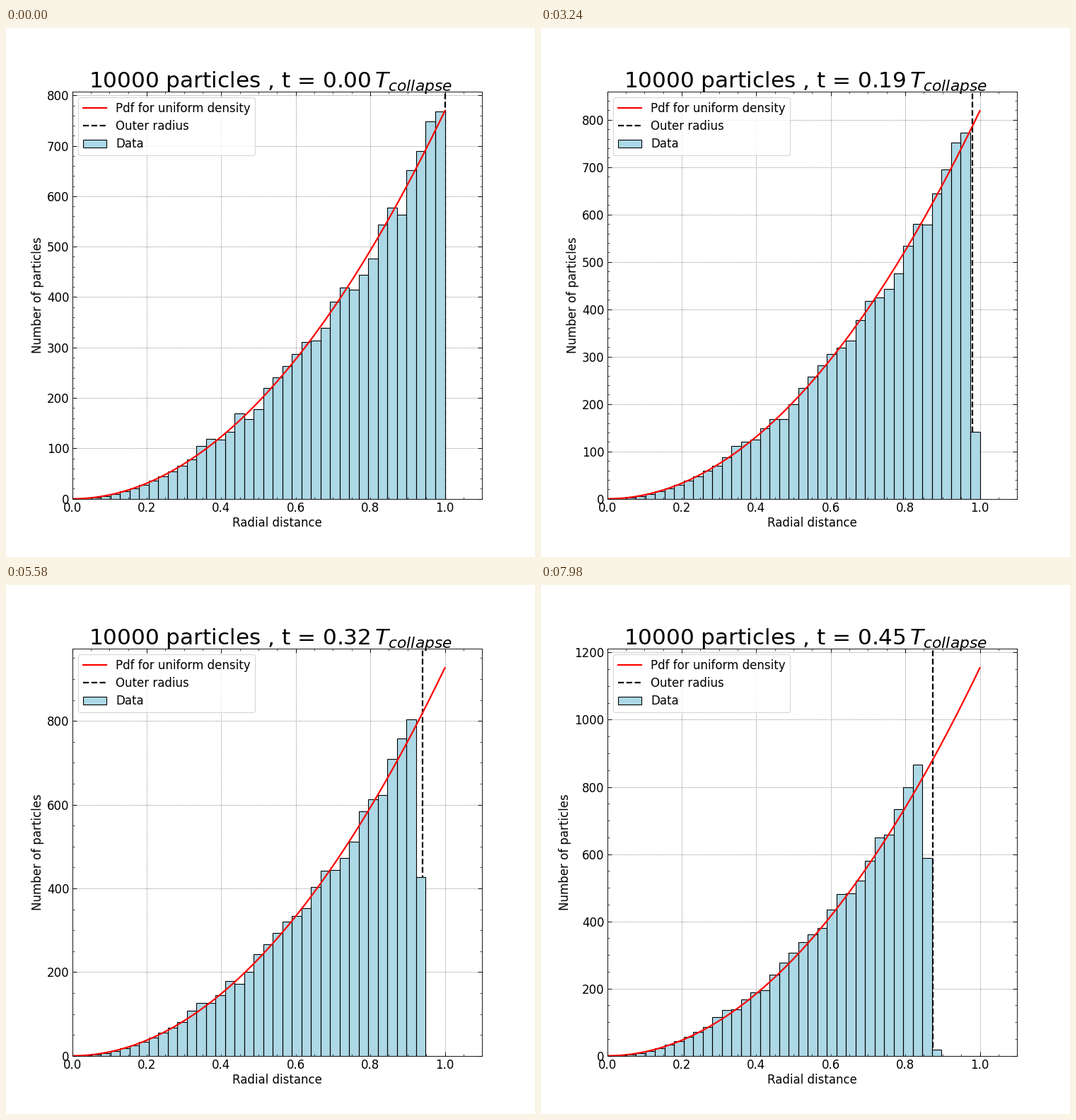
These frames come from a looping animation (748x748 px, 8000 ms). A matplotlib script:

```python
import numpy as np
import matplotlib.pyplot as plt
from matplotlib.animation import FuncAnimation
from matplotlib.lines import Line2D, TICKDOWN, TICKLEFT, TICKRIGHT, TICKUP
from matplotlib.patches import PathPatch
from matplotlib.path import Path
from matplotlib.ticker import MultipleLocator

plt.rcParams.update({"font.family": "DejaVu Sans", "font.size": 15})

PARTICLES = 10000
BINS = 39
TICK_MS = 20
TICKS = 400
LAST_STEP = 171
TIME_STEP = 0.002655  # collapse times per simulation step

edges = np.linspace(0, 1, BINS + 1)
radius = np.linspace(0, 1, 1000)

# Sampling noise: bin edge, surplus of enclosed particles over a uniform ball.
NOISE = [(0, 0), (13, -12), (15, 14), (17, 5), (18, 19), (20, -12), (25, 26),
         (27, -6), (29, 11), (32, -66), (34, -46), (35, -86), (37, -55),
         (38, -18), (39, 0)]
noise_edge, noise_count = zip(*NOISE)
enclosed = (PARTICLES * radius**3
            + np.interp(radius * BINS, noise_edge, noise_count))


def outer_radius(n):
    return 1 - 4.18e-6 * n**2 - 5e-12 * n**4


def bin_counts(n):
    """Shells shrink together, the bulk a little faster than the rim."""
    lead = 0.0115 * (n / LAST_STEP)**3
    shell = outer_radius(n) * radius * (1 - lead * (1 - radius**240))
    return np.diff(np.interp(edges, shell, enclosed))


def bars_path(counts):
    left, right = edges[:-1], edges[1:]
    zero = np.zeros(BINS)
    x = np.stack([left, left, right, right, left], axis=1)
    y = np.stack([zero, counts, counts, zero, zero], axis=1)
    codes = [Path.MOVETO] + [Path.LINETO] * 3 + [Path.CLOSEPOLY]
    return Path(np.column_stack([x.ravel(), y.ravel()]), codes * BINS)


def step_at(tick):
    """Steps last 20, 20 and 100 ms in turn."""
    if tick < 6:
        return min(tick, 1)
    cycle, rest = divmod(tick - 6, 7)
    return 2 + 3 * cycle + min(rest, 2)


fig, ax = plt.subplots(figsize=(9.35, 9.35), dpi=80)
ax.set_xlim(0, 1.1)
ax.set_axisbelow(True)
ax.grid(color="0.4", linestyle=":", linewidth=0.8)
ax.tick_params(direction="in", top=True, right=True, length=5)
ax.xaxis.set_major_locator(MultipleLocator(0.2))
ax.set_xlabel("Radial distance", labelpad=3)
ax.set_ylabel("Number of particles")
title = fig.text(0.5, 0.921, "", size=28, ha="center", va="top")

outer = ax.axvline(1, color="k", linestyle="--", linewidth=2, zorder=0.8,
                   label="Outer radius")
bars = PathPatch(bars_path(np.zeros(BINS)), facecolor="lightblue",
                 edgecolor="k", linewidth=1, snap=True, label="Data")
ax.add_patch(bars)
pdf, = ax.plot(radius, radius, color="r", linewidth=2,
               label="Pdf for uniform density")
ax.legend(handles=[pdf, outer, bars], loc="upper left", labelspacing=0.44)


def minor_ticks(x, y, marker, transform):
    line = Line2D(x, y, marker=marker, linestyle="none", color="k",
                  markersize=3, markeredgewidth=0.6, transform=transform,
                  clip_on=False, zorder=2.4)
    return ax.add_artist(line)


x_minor = np.arange(0, 1.101, 0.05)
for side, marker in ((0, TICKUP), (1, TICKDOWN)):
    minor_ticks(x_minor, np.full(len(x_minor), side), marker,
                ax.get_xaxis_transform())
y_minor = [minor_ticks([side], [0], marker, ax.get_yaxis_transform())
           for side, marker in ((0, TICKRIGHT), (1, TICKLEFT))]


def update(tick):
    n = step_at(tick)
    size = outer_radius(n)
    counts = bin_counts(n)
    curve = 3 * PARTICLES / BINS * radius**2 / size**3

    bars.set_path(bars_path(counts))
    pdf.set_ydata(curve)
    outer.set_xdata([size, size])
    title.set_text(f"{PARTICLES} particles , t = {n * TIME_STEP:.2f}"
                   r"$\,T_{collapse}$")

    top = 1.05 * max(curve[-1], counts.max())
    major, minor = (100, 20) if top < 900 else (200, 50)
    ax.set_ylim(0, top)
    ax.yaxis.set_major_locator(MultipleLocator(major))
    marks = np.arange(0, top, minor)
    for side, line in enumerate(y_minor):
        line.set_data(np.full(len(marks), side), marks)
    return bars, pdf, outer, title


anim = FuncAnimation(fig, update, frames=TICKS, interval=TICK_MS,
                     init_func=lambda: update(0), repeat=True,
                     repeat_delay=0, blit=False)
plt.show()
```
